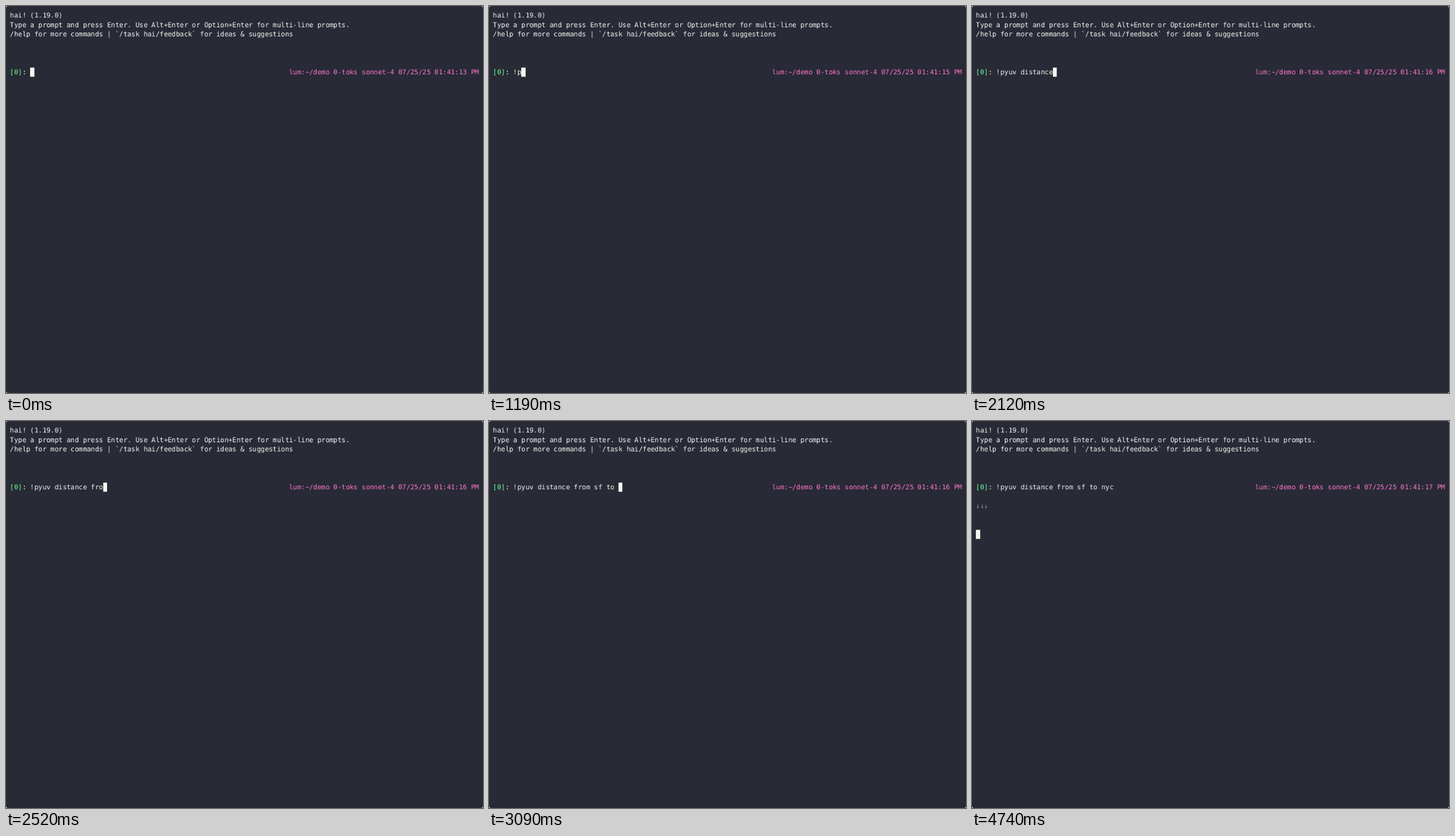
These frames come from a looping animation (831 by 674 pixels, 8 s). An HTML page with a canvas:

```html
<!DOCTYPE html>
<html lang="en">
<head>
<meta charset="utf-8">
<title>Terminal</title>
<style>
  html, body { margin: 0; width: 100%; height: 100%; overflow: hidden; background: #fff; }
  canvas { display: block; width: 831px; height: 674px; }
</style>
</head>
<body>
<canvas id="term" width="991" height="804"></canvas>
<script>
const LOOP = 8000, ENTER = 3540, NEWLINE = 4740;
const FONT_SIZE = 14, CELL_W = FONT_SIZE * .6, CELL_H = FONT_SIZE * 1.4;
const FG = "#f8f8f2", BG = "#282a36", GREEN = "#69ff94", PINK = "#ff79c6", DIM = FG + "80";
const COMMAND = "!pyuv distance from sf to nyc";
const PROMPT_ROW = 6, PROMPT_COL = 5;

// Typing rhythm: [time in ms, characters typed], even pace in between
const rhythm = [
  [730, 1], [1190, 2], [1260, 3], [1430, 4], [1610, 6], [2120, 14],
  [2250, 15], [2760, 22], [3040, 25], [3090, 26], [3250, 27], [3410, 29]
];

// Time of every key press
const presses = [];
let [lastTime, lastCount] = [0, 0];
for (const [time, count] of rhythm) {
  const pace = (time - lastTime) / (count - lastCount);
  for (let left = count - lastCount - 1; left >= 0; left--) presses.push(time - left * pace);
  [lastTime, lastCount] = [time, count];
}

const ctx = document.getElementById("term").getContext("2d");

// The grid snaps to whole canvas pixels
const colX = col => Math.round((col + 1) * CELL_W);
const rowY = row => Math.round(10 + row * CELL_H);

function print(row, col, str, color = FG) {
  ctx.fillStyle = color;
  [...str].forEach((ch, i) => ctx.fillText(ch, colX(col + i), rowY(row) + FONT_SIZE));
}

function drawCursor(row, col) {
  const x = colX(col), y = rowY(row);
  ctx.fillStyle = FG;
  ctx.fillRect(x, y, colX(col + 1) - x, rowY(row + 1) - y);
}

function drawScreen() {
  const { width, height } = ctx.canvas;
  ctx.clearRect(0, 0, width, height);
  ctx.fillStyle = BG;
  ctx.beginPath();
  ctx.roundRect(0, 0, width, height, 4);
  ctx.fill();
}

function render(t) {
  const typed = presses.filter(press => press <= t).length;
  // The clock only refreshes on a key press
  const refreshed = typed ? presses[typed - 1] : 0;
  const seconds = 13 + Math.floor((refreshed + 900) / 1000);

  drawScreen();
  ctx.font = `${FONT_SIZE}px "DejaVu Sans Mono", monospace`;
  ctx.textRendering = "geometricPrecision";

  print(0, 0, "hai! (1.19.0)");
  print(1, 0, "Type a prompt and press Enter. Use Alt+Enter or Option+Enter for multi-line prompts.");
  print(2, 0, "/help for more commands | `/task hai/feedback` for ideas & suggestions");
  print(PROMPT_ROW, 0, "[0]", GREEN);
  print(PROMPT_ROW, 3, ":");
  print(PROMPT_ROW, PROMPT_COL, COMMAND.slice(0, typed));
  print(PROMPT_ROW, 69, `lum:~/demo 0-toks sonnet-4 07/25/25 01:41:${seconds} PM`, PINK);

  if (t < ENTER) {
    drawCursor(PROMPT_ROW, PROMPT_COL + typed);
  } else {
    print(8, 0, "↓↓↓", DIM);
    drawCursor(t < NEWLINE ? 10 : 11, 0);
  }
}

const begin = performance.now();
function tick() {
  render((performance.now() - begin) % LOOP);
  requestAnimationFrame(tick);
}
tick();
</script>
</body>
</html>
```
